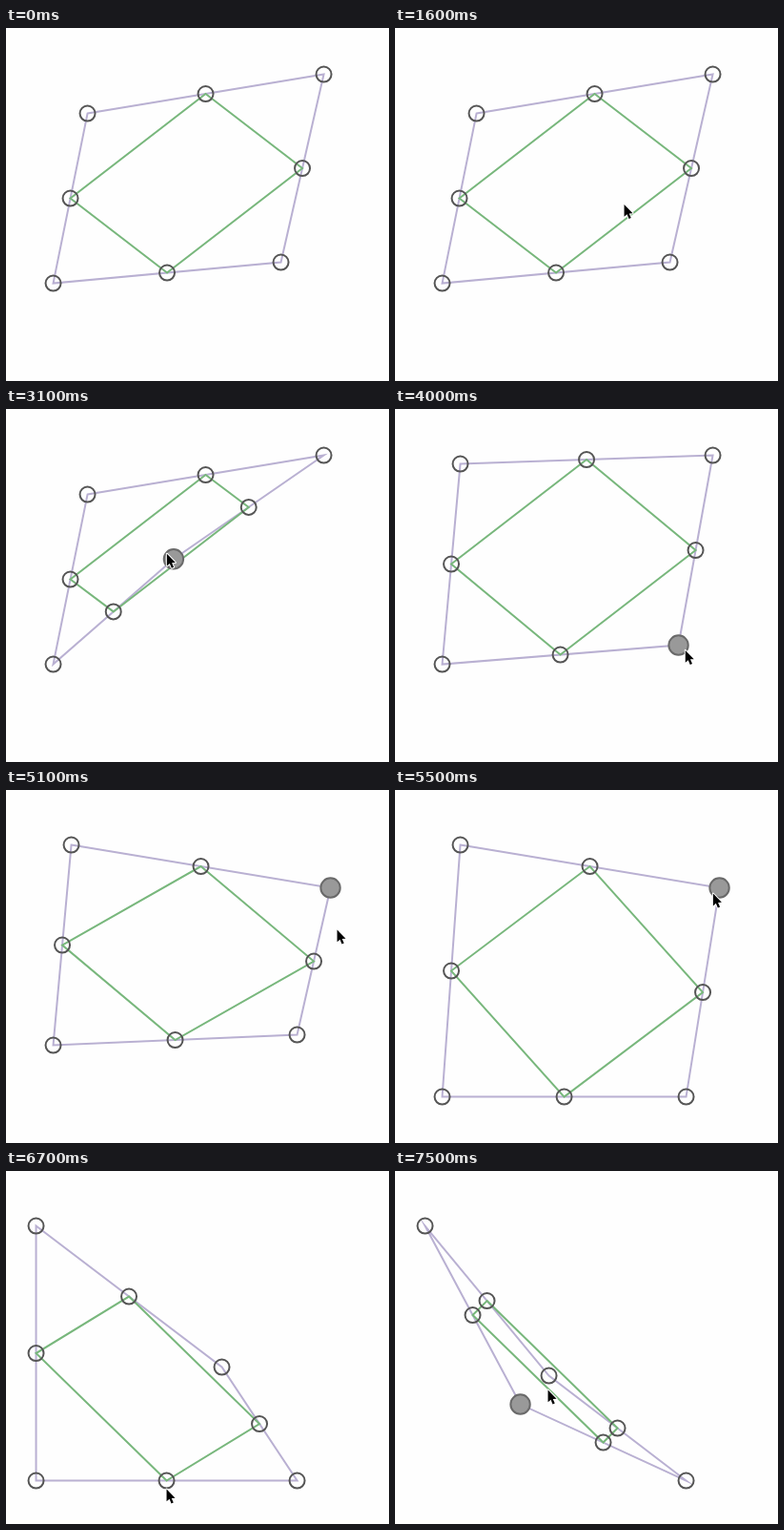
An HTML page with a canvas for the animation above (7600 ms loop, 402 px wide and 370 px high).

```html
<!DOCTYPE html>
<html lang="en">
<head>
<meta charset="utf-8">
<title>Midpoint parallelogram</title>
<style>
  html, body { margin: 0; width: 100%; height: 100%; overflow: hidden; background: #fefefe; }
  canvas { display: block; }
</style>
</head>
<body>
<canvas id="stage" width="402" height="370"></canvas>
<script>
const ctx = document.getElementById('stage').getContext('2d');
const LOOP = 7600, STEP = 100, APPEAR = 16, LEAD = 9;

// [corners held, first step, last step, goal x, goal y]
// Two corners are a side, kept level or upright; none is the bare pointer.
const drags = [
  ['C', 19, 23, 262, 225],
  ['C', 24, 32, 163, 147],
  ['A', 34, 36, 68, 57],
  ['C', 38, 40, 297, 247],
  ['C', 40, 41, 305, 256],
  ['B', 44, 46, 349, 13],
  ['B', 46, 50, 340, 102],
  ['', 50, 51, 347, 146],
  ['CD', 52, 54, null, 321],
  ['B', 55, 59, 226, 205],
  ['', 59, 60, 181, 215],
  ['AD', 61, 65, 31, null],
  ['CD', 66, 67, null, 324],
  ['B', 69, 71, 161, 214],
  ['D', 72, 74, 131, 244],
  ['', 74, 75, 160, 229]
];

const mix = (a, b, u) => a + (b - a) * u;
const blend = (p, q, u) => [mix(p[0], q[0], u), mix(p[1], q[1], u)];
const center = points => blend(points[0], points[points.length - 1], 0.5);

// Replays the drags up to step s
function pose(s) {
  const quad = { A: [85, 89], B: [333, 48], C: [288, 245], D: [49, 267] };
  let tip = [240, 184.5], last = APPEAR, picked = '';

  for (const [held, from, to, x, y] of drags) {
    const parts = held ? [...held].map(name => quad[name]) : [tip];
    const grab = center(parts);
    const dx = (x ?? grab[0]) - grab[0], dy = (y ?? grab[1]) - grab[1];
    const lead = held ? LEAD / Math.hypot(dx, dy) : 0;
    const ahead = p => [p[0] + dx * lead, p[1] + dy * lead];

    if (s < from) {
      tip = blend(tip, ahead(grab), (s - last) / (from - last));
      break;
    }
    const u = Math.min(1, (s - from) / (to - from));
    for (const p of parts) {
      p[0] = mix(p[0], x ?? p[0], u);
      p[1] = mix(p[1], y ?? p[1], u);
    }
    tip = ahead(center(parts));
    last = to;
    if (held) picked = s <= to + 1 ? held : '';
    if (s <= to) break;
  }
  return { quad, tip, picked };
}

function polygon(points, color, width) {
  ctx.beginPath();
  points.forEach(p => ctx.lineTo(...p));
  ctx.closePath();
  ctx.strokeStyle = color;
  ctx.lineWidth = width;
  ctx.stroke();
}

function handle([x, y], selected) {
  ctx.beginPath();
  ctx.arc(x, y, selected ? 10.2 : 8, 0, 2 * Math.PI);
  if (selected) {
    ctx.fillStyle = '#999';
    ctx.fill();
  }
  ctx.strokeStyle = selected ? '#6a6a6a' : '#555';
  ctx.lineWidth = 2;
  ctx.stroke();
}

function drawPointer([x, y]) {
  const arrow = [[0, 0], [0, 12.8], [3, 10.2], [5, 15], [7.2, 14], [5.2, 9.4], [9, 9.2]];
  ctx.lineJoin = 'round';
  polygon(arrow.map(p => [x + p[0], y + p[1]]), '#fff', 2);
  ctx.fillStyle = '#000';
  ctx.fill();
  ctx.lineJoin = 'miter';
}

function draw(s) {
  const { quad, tip, picked } = pose(s);
  const points = Object.values(quad);
  const mids = points.map((p, i) => blend(p, points[(i + 1) % 4], 0.5));

  ctx.setTransform(1, 0, 0, 1, 0, 0);
  ctx.fillStyle = '#fefefe';
  ctx.fillRect(0, 0, 402, 370);
  ctx.translate(0.55, 0.55);
  polygon(points, '#b9b0d2', 2);
  polygon(mids, '#78b77c', 2);
  mids.forEach(p => handle(p, false));
  for (const name in quad) handle(quad[name], name === picked);
  if (s >= APPEAR) drawPointer(tip);
}

const start = performance.now();
function frame() {
  draw(Math.floor((performance.now() - start) % LOOP / STEP));
  requestAnimationFrame(frame);
}
frame();
</script>
</body>
</html>
```
